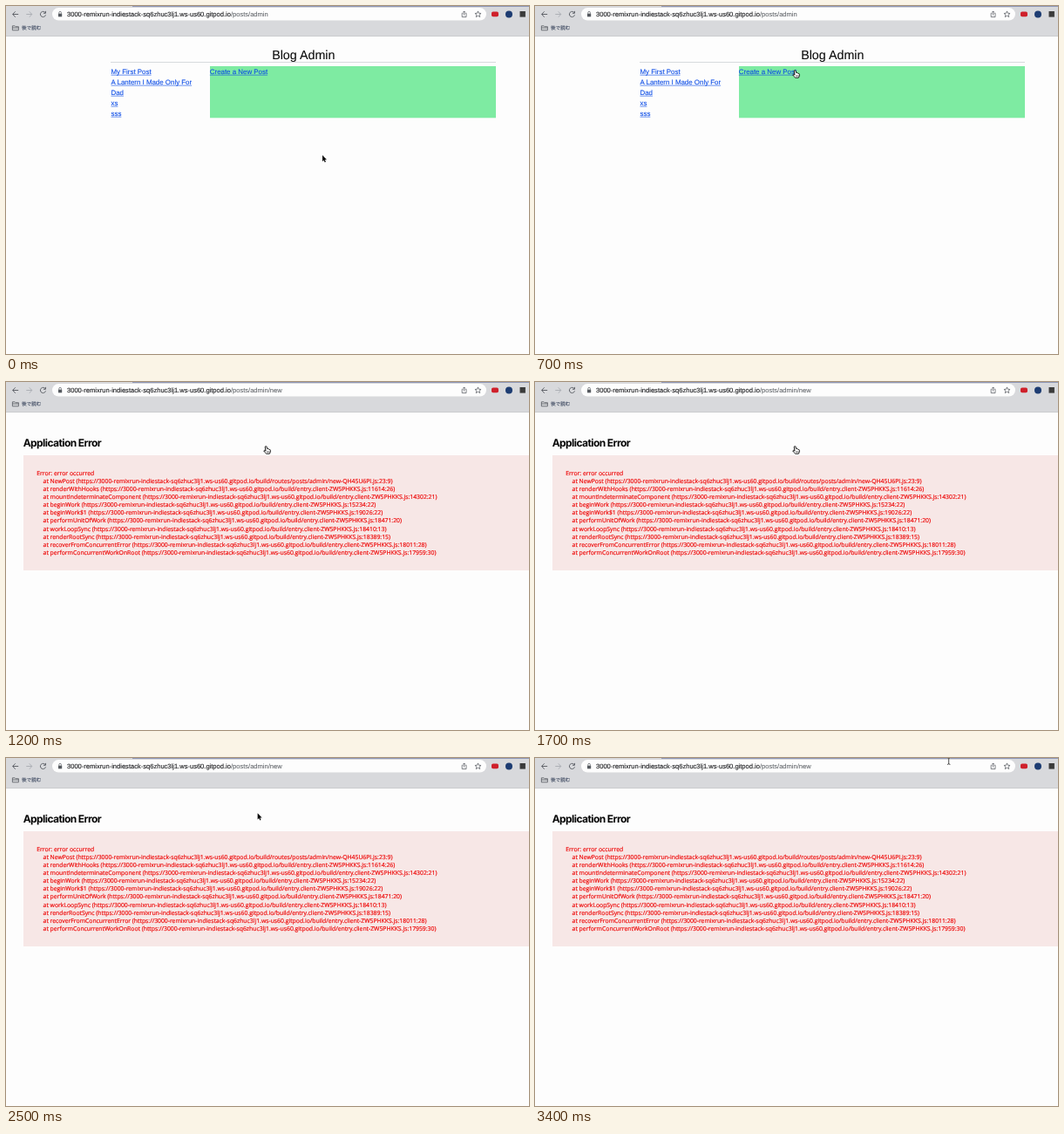
An HTML page with a canvas for the animation above (3500 ms loop, 600 by 399 pixels).

```html
<!DOCTYPE html>
<html lang="en">
<head>
<meta charset="utf-8">
<title>Blog Admin</title>
<style>
html, body { margin: 0; width: 100%; height: 100%; overflow: hidden; background: #fdfdfd; }
canvas { display: block; width: 600px; height: 399px; }
</style>
</head>
<body>
<canvas id="stage"></canvas>
<script>
const W = 600, H = 399, LOOP = 3500, STEP = 100;
const URL_AT = 1100, ERROR_AT = 1200;
const SANS = '"Liberation Sans", Arial, sans-serif';
const TITLE = 'Inter, "Liberation Sans", sans-serif';
const TRACE = '"Open Sans", "Noto Sans", sans-serif';
const JA = '"Noto Sans CJK JP", "Noto Sans CJK", sans-serif';
const HOST = '3000-remixrun-indiestack-sq6zhuc3lj1.ws-us60.gitpod.io';
const BUILD = 'https://' + HOST + '/build/';
const CLIENT = 'entry.client-ZW5PHKKS.js:';
const LINK = '#0a4be6', ICON = '#55595f', BAR = '#d8d9dc';

const posts = ['My First Post', 'A Lantern I Made Only For', 'Dad', 'xs', 'sss'];
const calls = [
  ['NewPost', 'routes/posts/admin/new-QH45U6PI.js:23:9'],
  ['renderWithHooks', CLIENT + '11614:26'],
  ['mountIndeterminateComponent', CLIENT + '14302:21'],
  ['beginWork', CLIENT + '15234:22'],
  ['beginWork$1', CLIENT + '19026:22'],
  ['performUnitOfWork', CLIENT + '18471:20'],
  ['workLoopSync', CLIENT + '18410:13'],
  ['renderRootSync', CLIENT + '18389:15'],
  ['recoverFromConcurrentError', CLIENT + '18011:28'],
  ['performConcurrentWorkOnRoot', CLIENT + '17959:30']
];

// pointer keys: time, x, y
const keys = [
  [0, 363, 171], [400, 300.5, 72], [500, 298.2, 73.6], [2400, 298.2, 73.6],
  [2800, 237, 7], [3400, 474.7, 3.7]
];

const canvas = document.getElementById('stage');
const ctx = canvas.getContext('2d');
const dpr = window.devicePixelRatio || 1;
canvas.width = W * dpr;
canvas.height = H * dpr;

function rect(x, y, w, h, color) {
  ctx.fillStyle = color;
  ctx.fillRect(x, y, w, h);
}

function disc(x, y, r, color) {
  ctx.fillStyle = color;
  ctx.beginPath();
  ctx.arc(x, y, r, 0, Math.PI * 2);
  ctx.fill();
}

function pill(x, y, w, h, r, color) {
  ctx.fillStyle = color;
  ctx.beginPath();
  ctx.roundRect(x, y, w, h, r);
  ctx.fill();
}

function line(d, color, width = 0.9) {
  ctx.strokeStyle = color;
  ctx.lineWidth = width;
  ctx.stroke(new Path2D(d));
}

// Sets type at double size on a halved scale for even spacing; returns the width.
// `ink` thickens the strokes.
function text(str, x, y, size, color, opt = {}) {
  const { family = SANS, weight = 400, align = 'left', track = 0, ink = 0 } = opt;
  ctx.save();
  ctx.translate(x, y);
  ctx.scale(0.5, 0.5);
  ctx.textRendering = 'geometricPrecision';
  ctx.font = `${weight} ${size * 2}px ${family}`;
  ctx.letterSpacing = `${track * size * 2}px`;
  ctx.textAlign = align;
  ctx.fillStyle = ctx.strokeStyle = color;
  ctx.lineJoin = 'round';
  ctx.lineWidth = ink * 2;
  ctx.fillText(str, 0, 0);
  if (ink) ctx.strokeText(str, 0, 0);
  const w = ctx.measureText(str).width / 2;
  ctx.restore();
  return w;
}

function link(str, x, y) {
  const w = text(str, x, y, 7.9, LINK, { ink: 0.1 });
  rect(x, y + 0.9, w, 0.6, LINK);
}

function star(x, y, r) {
  ctx.beginPath();
  for (let i = 0; i < 10; i++) {
    const a = i * Math.PI / 5 - Math.PI / 2, d = i % 2 ? r * 0.45 : r;
    ctx.lineTo(x + d * Math.cos(a), y + d * Math.sin(a));
  }
  ctx.closePath();
  ctx.strokeStyle = ICON;
  ctx.lineWidth = 0.75;
  ctx.stroke();
}

function drawBrowser(path) {
  rect(0, 0, W, 35, BAR);
  rect(145, 0, W - 145, 1, '#8f98b8');
  rect(0, 34.3, W, 0.7, '#c6c7ca');
  pill(53, 2, 498, 14.6, 7.3, '#fdfdfd');

  line('M14.2 9.5H7.8M10.8 6.3L7.6 9.5L10.8 12.7', ICON);
  line('M23.3 9.5H29.7M26.7 6.3L29.9 9.5L26.7 12.7', '#a9acb1');
  line('M45 7.6A3.1 3.1 0 1 0 45.5 10.3M45.5 5.9V8.3H43', ICON);

  rect(60, 8.7, 4.2, 3.6, ICON);
  line('M60.8 8.8V7.6A1.3 1.3 0 0 1 63.4 7.6V8.8', ICON, 0.7);
  const w = text(HOST, 70, 11.9, 7.55, '#202124', { ink: 0.14 });
  text(path, 70 + w, 11.9, 7.55, '#5f6368', { ink: 0.08 });

  line('M524.4 8.3H523.2V12.6H528V8.3H526.8M525.6 10.7V6M524.2 7.3L525.6 5.9L527 7.3', ICON, 0.75);
  star(541.5, 9.6, 3.7);
  pill(557, 6.4, 8, 5.8, 1.8, '#cf202b');
  disc(577, 9.4, 4, '#1d3c72');
  rect(589.5, 6, 6.4, 6.6, '#3b3b3b');

  line('M7.4 22.8H10.2L11 23.7H14.4V27.8H7.4ZM7.4 25H14.4', ICON, 0.8);
  text('後で読む', 18, 27.1, 5.6, '#36425a', { family: JA, weight: 500, ink: 0.12 });
}

function drawAdmin() {
  text('Blog Admin', 341.3, 60.9, 14.3, '#0b0b0b', { align: 'center', ink: 0.1 });
  rect(120, 64.2, 442, 0.8, '#cfd2d6');
  rect(234, 69, 328, 59.3, '#7eeba2');
  posts.forEach((p, i) => link(p, 120.5, 77.9 + i * 12));
  link('Create a New Post', 233.8, 77.9);
}

function drawError() {
  text('Application Error', 19.7, 73.6, 12, '#050505', { family: TITLE, weight: 700, track: -0.048 });
  rect(20, 84, 580, 132, '#f7e7e6');
  const row = (str, x, i) =>
    text(str, x, 106.5 + i * 9.15, 6.83, '#ee0c0c', { family: TRACE, ink: 0.2 });
  row('Error: error occurred', 35.2, 0);
  calls.forEach(([fn, file], i) => row(`at ${fn} (${BUILD}${file})`, 42.6, i + 1));
}

function pointerAt(t) {
  const i = Math.max(1, keys.findIndex(k => k[0] >= t));
  const [t0, x0, y0] = keys[i - 1], [t1, x1, y1] = keys[i];
  const u = (t - t0) / (t1 - t0), e = u * u * (3 - 2 * u);
  return [x0 + (x1 - x0) * e, y0 + (y1 - y0) * e];
}

function drawPointer(t) {
  const [x, y] = pointerAt(t);
  ctx.save();
  ctx.translate(x, y);
  ctx.lineJoin = 'round';
  if (t >= 500 && t <= 2400) {
    const hand = 'M-1 .6Q0-.5 .9 .6L1.5 3Q2.4 2.6 2.8 3.4Q3.7 3 4.1 3.9Q5.1 3.7 5.2 4.8L5 6.9L4.2 8.6H.5L-1.8 6.4Q-3 5-1.6 4.7L-.2 5.5Z';
    ctx.fillStyle = '#fff';
    ctx.fill(new Path2D(hand));
    line(hand, '#0a0a0a', 0.95);
    line('M1.4 5.6V7.4M2.6 5.6V7.4M3.7 5.6V7.4', '#222', 0.5);
  } else if (y < 17) {
    const beam = 'M-1.7-3.7Q0-3.7 0-2.6Q0-3.7 1.7-3.7M0-2.8V2.8M-1.7 3.7Q0 3.7 0 2.6Q0 3.7 1.7 3.7';
    line(beam, '#fff', 1.5);
    line(beam, '#222', 0.8);
  } else {
    const arrow = 'M0 0V7.2L1.6 5.7L2.7 8.3L3.9 7.8L2.8 5.2H5Z';
    line(arrow, '#fff', 0.9);
    ctx.fillStyle = '#0a0a0a';
    ctx.fill(new Path2D(arrow));
  }
  ctx.restore();
}

function draw(t) {
  ctx.setTransform(dpr, 0, 0, dpr, 0, 0);
  rect(0, 0, W, H, '#fdfdfd');
  drawBrowser(t < URL_AT ? '/posts/admin' : '/posts/admin/new');
  if (t < ERROR_AT) drawAdmin();
  else drawError();
  drawPointer(t);
}

const start = performance.now();
function tick(now) {
  const t = Math.max(0, now - start) % LOOP;
  draw(Math.floor(t / STEP) * STEP);
  requestAnimationFrame(tick);
}
draw(0);
requestAnimationFrame(tick);
</script>
</body>
</html>
```
